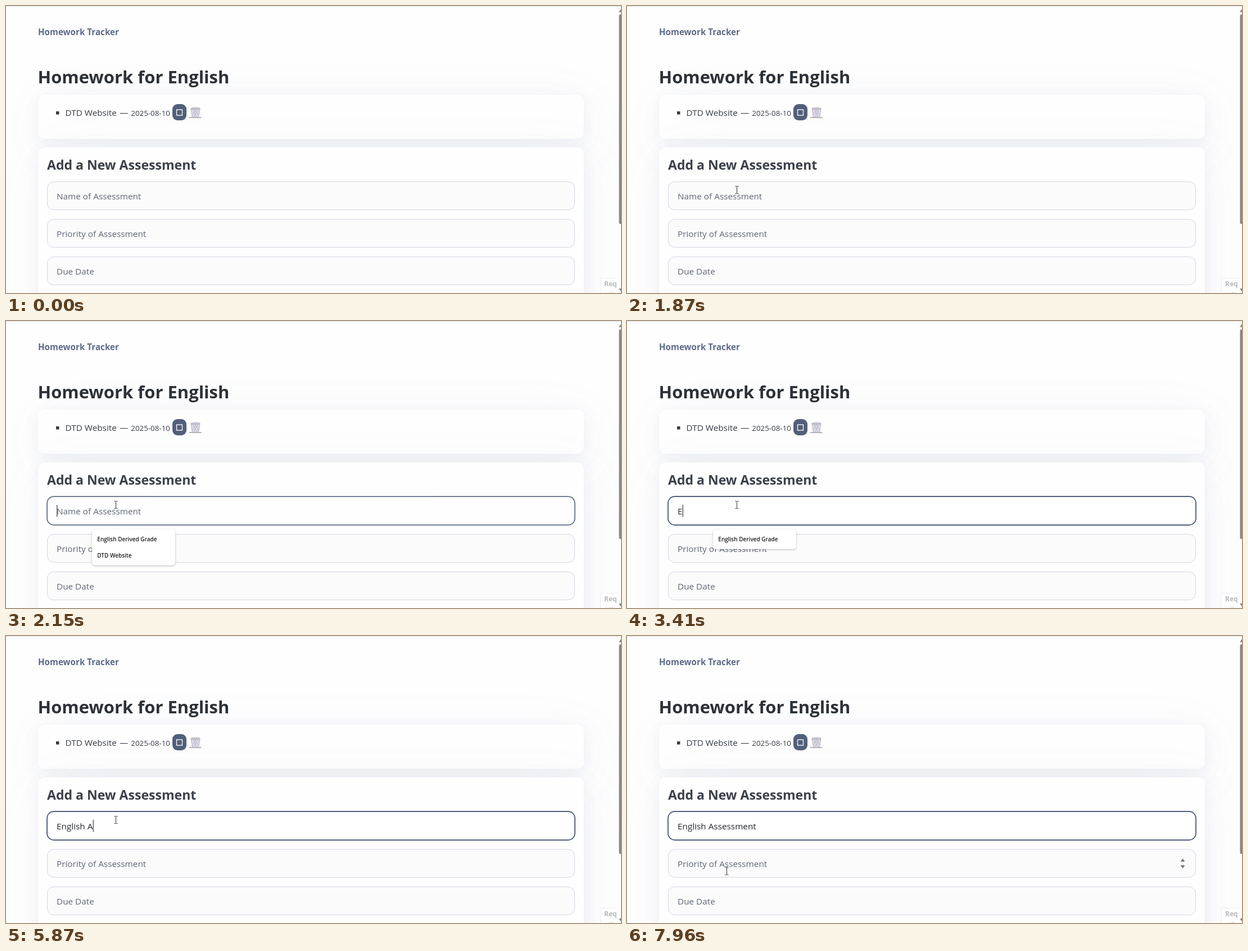
An HTML page for the animation above (8 s loop, 1094 by 512 pixels).

```html
<!DOCTYPE html>
<html lang="en">
<head>
<meta charset="utf-8">
<title>Homework Tracker</title>
<style>
html, body { margin: 0; width: 100%; height: 100%; overflow: hidden; background: #fefefe; font-size: 16.2px; }
#stage { position: absolute; left: 0; top: 0; width: 1094px; height: 512px; overflow: hidden; }
#stage > * { position: absolute; box-sizing: border-box; }
.card {
  left: 57px; width: 971px; border-radius: 12px; background: #fefefe;
  box-shadow: 0 .225rem 1.35rem rgba(129,145,181,.07), .2rem .417rem 2.5rem rgba(129,145,181,.05),
    .5rem 1rem 6rem rgba(129,145,181,.06), 0 0 0 .0625rem rgba(129,145,181,.015);
}
.field { left: 73px; width: 939px; height: 51px; border: 1px solid #d3d6e2; border-radius: 12px; background: #fbfbfc; }
svg { left: 0; top: 0; }
text { font-family: "Open Sans", "Noto Sans", sans-serif; font-size: 15.3px; fill: #373c44; white-space: pre; }
.bold { font-weight: 700; }
.hint { fill: #5f6573; }
#popup text { font-size: 10px; font-weight: 600; fill: #1b1b1b; }
#panel { filter: drop-shadow(0 1px 1.5px rgba(0,0,0,.28)); }
</style>
</head>
<body>
<div id="stage">
  <div class="card" style="top:158px;height:79px"></div>
  <div class="card" style="top:252px;height:400px"></div>
  <div class="field" id="name" style="top:313px"></div>
  <div class="field" style="top:380px"></div>
  <div class="field" style="top:446.5px"></div>
  <svg width="1094" height="512" viewBox="0 0 1094 512">
    <path d="M0 .5H1094" stroke="#dedee0"/>
    <text class="bold" x="57" y="52" style="font-size:15.2px;fill:#5d6b89">Homework Tracker</text>
    <text class="bold" x="56.5" y="138" style="font-size:30.95px;fill:#2d3138">Homework for English</text>
    <text class="bold" x="73" y="292" style="font-size:23.05px;fill:#3b4049">Add a New Assessment</text>

    <rect x="89" y="188" width="5.5" height="5.5" fill="#373c44"/>
    <text x="105.5" y="196">DTD Website</text>
    <text x="202" y="196">—</text>
    <text x="222.3" y="196" style="font-size:13.35px">2025-08-10</text>
    <rect x="296" y="175" width="25" height="29" rx="9" fill="#525f7a"/>
    <rect x="303.5" y="185" width="10" height="10" fill="none" stroke="#fff" stroke-width="1.3"/>
    <g stroke="#b3b1c0" fill="none">
      <path d="M326 199H347.5" stroke="#96939f" stroke-width="1.4"/>
      <path d="M329 183L331.5 198.5H342.5L345 183Z" fill="#dddbe6"/>
      <path d="M332 184L340 198M336.5 184L342 194M342 184L334 198M337.5 184L332 194" stroke-width=".8"/>
      <ellipse cx="337" cy="183" rx="8.3" ry="1.6" fill="#c8c6d3"/>
    </g>

    <text id="nameHint" class="hint" x="90" y="345.3">Name of Assessment</text>
    <text id="typed" x="90" y="345.3" style="fill:#23262c"></text>
    <rect id="caret" y="328" width="1.1" height="21.5" fill="#23262c"/>
    <text class="hint" x="90" y="412.3">Priority of Assessment</text>
    <text class="hint" x="90" y="478.8">Due Date</text>
    <path id="spinner" d="M984.5 402.5L988.5 397L992.5 402.5ZM984.5 409L988.5 414.5L992.5 409Z" fill="#757575"/>

    <g id="popup">
      <path d="M161 372L168.5 365.5L176 372Z" fill="#fff"/>
      <rect id="panel" x="153" y="372" width="148" rx="5" fill="#fff"/>
      <text x="162.3" y="393">English Derived Grade</text>
      <text id="secondItem" x="162.3" y="422">DTD Website</text>
    </g>

    <rect x="1057.5" y="485.5" width="40" height="40" fill="#fefefe" stroke="#eeeef1"/>
    <text class="bold" x="1064" y="500" style="font-size:12px;fill:#b9bac0">Req</text>
    <text x="1066" y="519" style="font-size:11px;fill:#e8b0b0">URL</text>
    <rect x="1088.5" y="1" width="6" height="511" fill="#fcfcfc"/>
    <rect x="1090.5" y="15" width="7" height="374" rx="3" fill="#858585"/>
    <path d="M1090 11L1094 5.5V11ZM1090 504H1094V509.5Z" fill="#858585"/>

    <path id="arrow" d="M0 0V14.5L3.4 11.4L5.7 16.5L8 15.5L5.8 10.5H10.3Z" fill="#fff" stroke="#222" stroke-width=".9"/>
    <path id="ibeam" d="M-3 -6.5H-1Q0 -6.5 0 -5.5Q0 -6.5 1 -6.5H3M0 -5.5V5.5M-3 6.5H-1Q0 6.5 0 5.5Q0 6.5 1 6.5H3" fill="none" stroke="#333"/>
  </svg>
</div>
<script>
const LOOP = 8000, BLINK = 530, FOCUS = 1930;

// Each burst types its letters at an even pace.
const BURSTS = [
  { text: 'Englis', start: 3410, gap: 132 },
  { text: 'h', start: 4800 },
  { text: ' ', start: 5200 },
  { text: 'Ass', start: 5820, gap: 90 },
  { text: 'e', start: 6290 },
  { text: 'ssment', start: 6490, gap: 122 }
];
const KEYS = BURSTS.flatMap(({ text, start, gap = 0 }) =>
  [...text].map((letter, i) => ({ letter, time: start + i * gap })));
const FIRST_KEY = KEYS[0].time;
const POPUP_END = KEYS.find(key => key.letter === 'A').time;

// The pointer glides between rest points in visible steps.
const ENTRY = [970, 499], TITLE = [384, 295], NAME = [195.5, 328], PRIORITY = [177.5, 419.5];
const GLIDES = [
  { start: 920, end: 1120, from: ENTRY, to: TITLE, steps: 3 },
  { start: 1310, end: 1870, from: TITLE, to: NAME, steps: 8 },
  { start: 7630, end: 7960, from: NAME, to: PRIORITY, steps: 5 }
];

const el = id => document.getElementById(id);
const show = (id, on) => el(id).style.display = on ? '' : 'none';
const clamp = v => Math.min(1, Math.max(0, v));
const smooth = p => p * p * (3 - 2 * p);
const lerp = (from, to, p) => from.map((v, i) => v + (to[i] - v) * p);
const inside = (y, top, height) => y >= top && y <= top + height;

function drawField(t) {
  const focus = clamp((t - 2020) / 150) * (t >= 2080);
  const border = `rgb(${lerp([211, 214, 226], [82, 95, 122], focus)})`;
  const style = el('name').style;
  style.borderColor = border;
  style.boxShadow = `0 0 0 ${focus * .9}px ${border}`;
  style.background = `rgb(${lerp([251, 251, 252], [255, 255, 255], focus)})`;

  const pressed = KEYS.filter(key => key.time <= t);
  el('typed').textContent = pressed.map(key => key.letter).join('');
  show('nameHint', !pressed.length);
  const blinkStart = pressed.length ? pressed[pressed.length - 1].time : 2020;
  show('caret', t >= FOCUS && (t - blinkStart) % (2 * BLINK) < BLINK);
  el('caret').setAttribute('x', 90.3 + (pressed.length ? el('typed').getComputedTextLength() : 0));
}

function drawPopup(t) {
  const filtered = t >= FIRST_KEY;
  show('popup', t >= FOCUS && t < POPUP_END);
  show('secondItem', !filtered);
  el('panel').setAttribute('height', filtered ? 35 : 64);
}

function drawMouse(t) {
  const glide = GLIDES.filter(g => g.start <= t).pop();
  let position = [-50, -50];
  if (glide) {
    const { start, end, from, to, steps } = glide;
    const p = Math.floor(clamp((t - start) / (end - start)) * steps + 1e-6) / steps;
    position = lerp(from, to, smooth(p));
  }
  const y = position[1];
  const overPriority = inside(y, 380, 51);
  const overField = overPriority || inside(y, 313, 51) || inside(y, 446, 51);
  for (const id of ['arrow', 'ibeam']) el(id).setAttribute('transform', `translate(${position})`);
  show('ibeam', overField);
  show('arrow', !overField);
  show('spinner', overPriority);
}

function frame() {
  const t = performance.now() % LOOP;
  drawField(t);
  drawPopup(t);
  drawMouse(t);
  requestAnimationFrame(frame);
}
frame();
</script>
</body>
</html>
```
